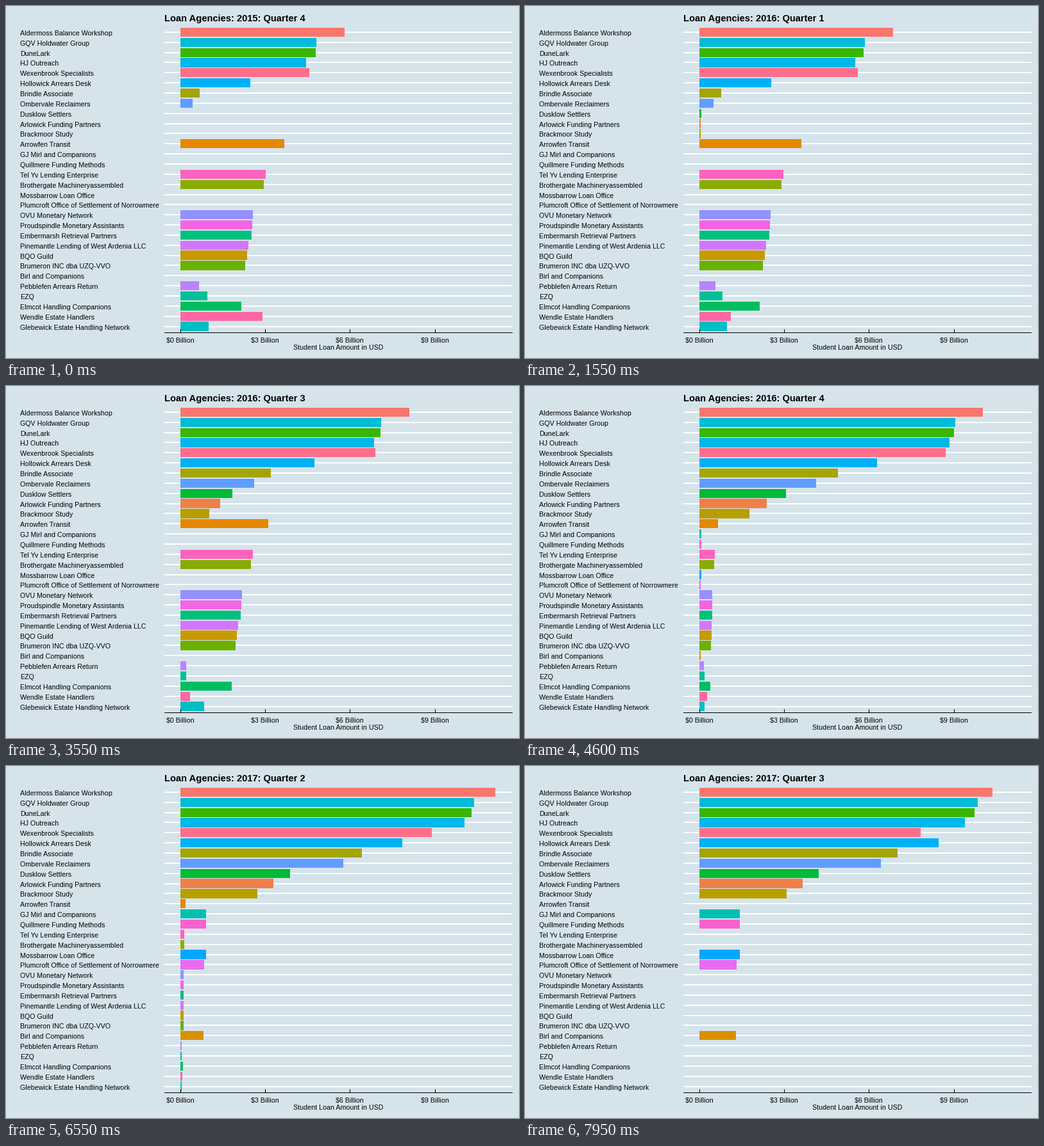
Write a matplotlib script that moves like this. It is 800 by 550 pixels and loops after 8000 ms.

```python
import numpy as np
import matplotlib.pyplot as plt
from matplotlib.animation import FuncAnimation
from matplotlib.patches import Rectangle

W, H, DPI = 800, 550, 100
STEPS, HOLD, STAGES = 20, 10, 8          # frames per quarter, still frames, quarters
LEFT, RIGHT, ZERO, AXIS_Y = 247, 790, 272, 510
PX_PER_BILLION = 44.07
FIRST_ROW, PITCH = 41.453, 15.848
HALF_BAR = 0.45 * PITCH

plt.rcParams["font.family"] = "Liberation Sans"

# Share of the first year's change reached at each of its quarters
SURGE = np.array([0, 0.24, 0.455, 0.537, 1])
CLIMB = np.array([0, 0, 0.21, 0.58, 1])
STEADY = np.array([0, 0.015, 0.06, 0.1, 1])
DROP = np.array([0, 0.1, 0.85, 0.96, 1])
SLUMP = np.array([0, 0.66, 0.95, 0.98, 1])
SECOND_YEAR = np.arange(1, 5) / 4


def path(start, mid, pace, tail):
    return np.concatenate([start + (mid - start) * pace, tail])


def surge(start, mid, end, bulge=57):
    """Rises to a crest in the second year, then settles."""
    u = SECOND_YEAR
    tail = mid + (end - mid) * u + bulge * np.sin(np.pi * u ** 0.6)
    return path(start, mid, SURGE, tail)


def climb(start, mid, end):
    """Grows all the way, easing out."""
    return path(start, mid, CLIMB, end - (end - mid) * (1 - SECOND_YEAR) ** 1.8)


def fade(start, pace=STEADY, keep=0.195):
    """Falls to a small share, then to nothing three quarters later."""
    mid = start * keep
    left = np.clip(1 - SECOND_YEAR * 4 / 3, 0, 1) ** 1.2
    return path(start, mid, pace, mid * left)


def late(end):
    """Appears in the second year only."""
    return path(0, 0, STEADY, end * np.clip(SECOND_YEAR * 1.6 - 0.2, 0, 1))


# Agency and its bar width in pixels at each quarter
AGENCIES = {
    "Aldermoss Balance Workshop": surge(256, 430, 455),
    "GQV Holdwater Group": surge(212, 386, 432),
    "DuneLark": surge(211, 384, 427),
    "HJ Outreach": surge(196, 377, 412),
    "Wexenbrook Specialists": surge(201, 378, 342, bulge=39),
    "Hollowick Arrears Desk": climb(109, 269, 374),
    "Brindle Associate": climb(30, 208, 310),
    "Ombervale Reclaimers": climb(18.5, 173, 284),
    "Dusklow Settlers": climb(0, 131, 186),
    "Arlowick Funding Partners": climb(0, 100, 162),
    "Brackmoor Study": climb(0, 73, 137),
    "Arrowfen Transit": fade(162),
    "GJ Mirl and Companions": late(63),
    "Quillmere Funding Methods": late(63),
    "Tel Yv Lending Enterprise": fade(133),
    "Brothergate Machineryassembled": fade(130),
    "Mossbarrow Loan Office": late(63),
    "Plumcroft Office of Settlement of Norrowmere": late(58),
    "OVU Monetary Network": fade(113),
    "Proudspindle Monetary Assistants": fade(112),
    "Embermarsh Retrieval Partners": fade(111),
    "Pinemantle Lending of West Ardenia LLC": fade(106),
    "BQO Guild": fade(104),
    "Brumeron INC dba UZQ-VVO": fade(101),
    "Birl and Companions": late(57),
    "Pebblefen Arrears Return": fade(29, DROP, keep=0.28),
    "EZQ": fade(42, DROP),
    "Elmcot Handling Companions": fade(95),
    "Wendle Estate Handlers": fade(128, SLUMP, keep=0.1),
    "Glebewick Estate Handling Network": fade(44),
}
WIDTHS = np.array(list(AGENCIES.values()))


def hue_color(share, light=65, chroma=100):
    """Hue at a share of the colour circle in polar CIELUV, as sRGB."""
    angle = np.radians(15 + 360 * share)
    u = chroma * np.cos(angle) / (13 * light) + 0.1978
    v = chroma * np.sin(angle) / (13 * light) + 0.4683
    y = ((light + 16) / 116) ** 3
    x = 9 * y * u / (4 * v)
    z = 3 * y / v - x / 3 - 5 * y
    linear = np.clip([3.2405 * x - 1.5371 * y - 0.4985 * z,
                      -0.9693 * x + 1.8760 * y + 0.0416 * z,
                      0.0556 * x - 0.2040 * y + 1.0572 * z], 0, 1)
    return np.where(linear > 0.00304,
                    1.055 * linear ** (1 / 2.4) - 0.055, 12.92 * linear)


fig = plt.figure(figsize=(W / DPI, H / DPI), dpi=DPI, facecolor="#D5E4EB")
ax = fig.add_axes([0, 0, 1, 1])
ax.set(xlim=(0, W), ylim=(H, 0))
ax.axis("off")


def box(x, y, w, h, color, z=1):
    return ax.add_patch(Rectangle((x, y), w, h, facecolor=color, linewidth=0,
                                  antialiased=False, zorder=z))


def label(x, baseline, text, size=10.67, **style):
    return ax.text(x, baseline, text, fontsize=size * 72 / DPI,
                   va="baseline", **style)


# Hues go round the circle in alphabetical order of the names
alphabetical = sorted(AGENCIES, key=str.lower)
bars = []
for i, name in enumerate(AGENCIES):
    center = FIRST_ROW + PITCH * i
    top, bottom = int(center - HALF_BAR), int(center + HALF_BAR)
    color = hue_color(alphabetical.index(name) / len(AGENCIES))
    box(LEFT, int(center) - 1, RIGHT - LEFT, 2, "white")
    bars.append(box(ZERO, top, 0, bottom - top, color, 2))
    label(22, int(center) + 5, name)

box(LEFT, AXIS_Y, RIGHT - LEFT, 1, "black", 3)
for amount in range(0, 10, 3):
    x = round(ZERO + amount * PX_PER_BILLION)
    box(x, AXIS_Y - 5, 1, 5, "black", 3)
    label(x, 526, rf"\${amount} Billion", ha="center")
label(518, 537, "Student Loan Amount in USD", ha="center")
title = label(LEFT, 24, "", 14.6, weight="bold")


def update(frame):
    stage, step = divmod(frame, STEPS)
    t = max(0, step - HOLD) / (STEPS - HOLD)
    widths = (1 - t) * WIDTHS[:, stage] + t * WIDTHS[:, stage + 1]
    for bar, width in zip(bars, widths):
        bar.set_width(int(width + 0.5))
        bar.set_visible(width >= 0.5)
    years, quarter = divmod(stage + 3, 4)
    title.set_text(f"Loan Agencies: {2015 + years}: Quarter {quarter + 1}")
    return [*bars, title]


animation = FuncAnimation(fig, update, frames=STEPS * STAGES, interval=50,
                          repeat=True, repeat_delay=0)
plt.show()
```
